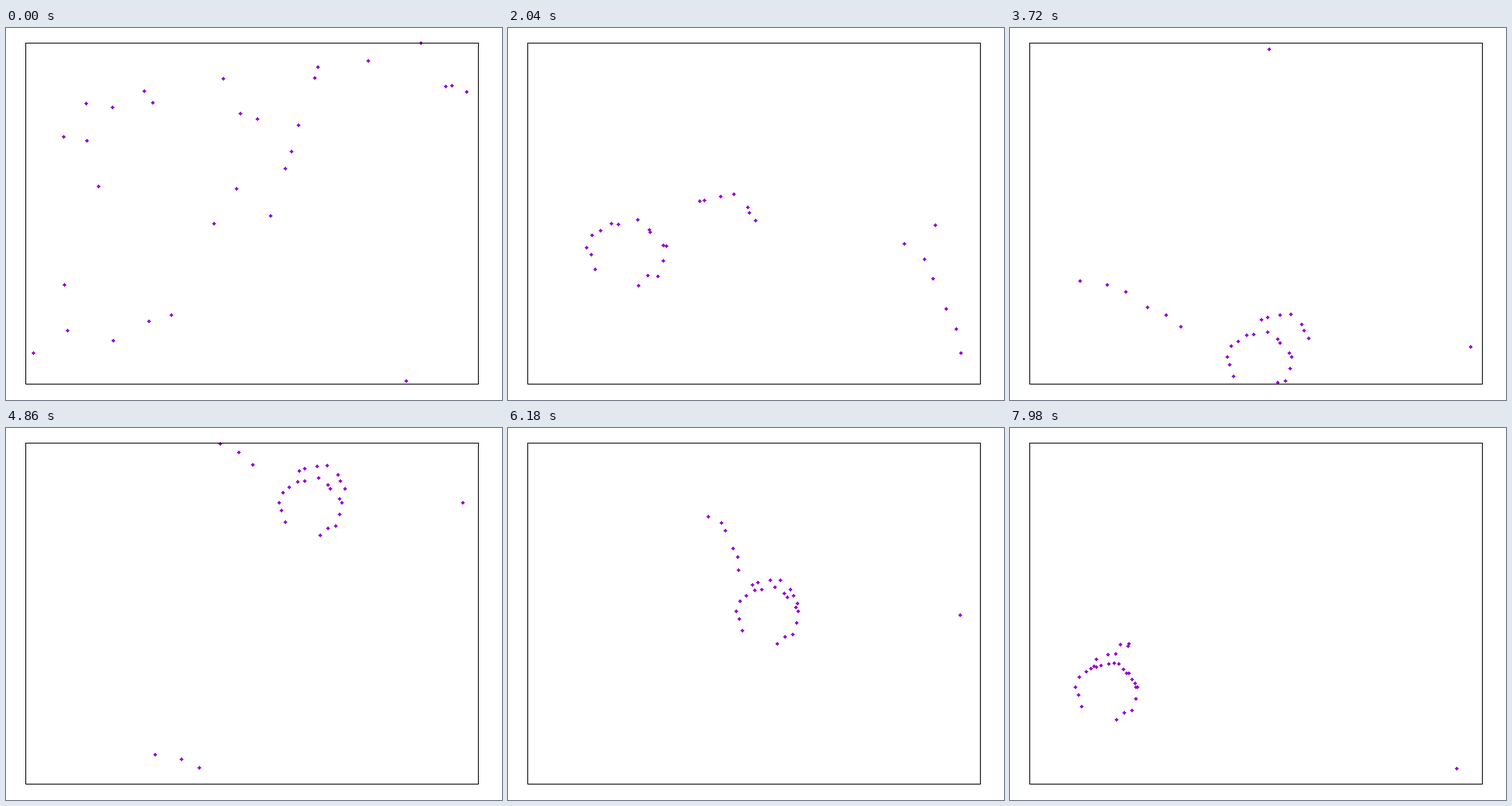
Write a matplotlib script that moves like this. It is 640 px wide and 480 px high and loops after 8000 ms.

```python
import numpy as np
import matplotlib.pyplot as plt
from matplotlib.animation import FuncAnimation
from matplotlib.collections import PolyCollection
from matplotlib.patches import Rectangle

W, H, DPI = 640, 480, 100
FRAMES, STEP = 400, 20
CORNER = np.array([25, 19])
SIZE = np.array([584, 440])      # the box is a torus
PURPLE = "#9400d3"

rng = np.random.default_rng(4)
steps = np.arange(FRAMES)
knots = np.array([0, 38, 102, 186, 243, 309, 399])
scatter = np.exp(-steps / 45)    # how disordered the birds still are


def route(*xy):
    """Smooth path through one point per knot, shape (FRAMES, 2).

    Points run on past the box edge and are wrapped when drawn."""
    pts = np.array(xy, float).reshape(-1, 2)
    slopes = np.gradient(pts, knots, axis=0, edge_order=2)
    i = np.clip(np.searchsorted(knots, steps, side="right") - 1, 0, len(knots) - 2)
    span = (knots[i + 1] - knots[i])[:, None]
    u = (steps - knots[i])[:, None] / span
    ease = u * u * (3 - 2 * u)
    return (pts[i] * (1 - ease) + pts[i + 1] * ease
            + span * u * (1 - u) * ((1 - u) * slopes[i] - u * slopes[i + 1]))


def wobble(count, calm, wild):
    """Seeded offsets that settle from wild to calm, shape (FRAMES, count, 2)."""
    size = calm + (wild - calm) * scatter
    return size[:, None, None] * rng.uniform(-1, 1, (count, 2))


def arch(centre, count, first, last):
    """Birds spread over part of an ellipse that shrinks as they gather."""
    a = np.radians(np.linspace(first, last, count))
    ring = np.stack([np.cos(a), np.sin(a)], axis=1)
    radii = np.stack([40 + 110 * scatter, 37 + 50 * scatter], axis=1)
    return centre[:, None] + radii[:, None] * ring + wobble(count, 4, 38)


def string(head, tail, count):
    """Birds in a row between two moving ends."""
    share = np.linspace(0, 1, count)[:, None]
    row = head[:, None] + (tail - head)[:, None] * share
    return row + wobble(count, 7, 25)


lead = route(215, 160, 210, 180, 150, 290, 320, 430, 391, 542, 333, 682, 123, 780)
head = route(549, 436, 463, 408, 516, 270, 678, 319, 780, 414, 846, 548, 740, 715)
tail = route(803, 378, 695, 384, 586, 422, 806, 387, 904, 489, 883, 625, 697, 740)
loner = route(659, 331, 565, 361, 551, 254, 594, 411, 589, 536, 583, 681, 576, 879)

# the second flock closes in on the first until it rides on its back
lag = np.stack([262 / (1 + np.exp((steps - 95) / 40)),
                -45 * (1 - steps / FRAMES)], axis=1)

birds = np.concatenate([arch(lead, 16, 150, 430),
                        arch(lead + lag, 7, 235, 355),
                        string(head, tail, 6),
                        loner[:, None]], axis=1)
spots = np.rint(CORNER + (birds - CORNER) % SIZE) + 0.5

fig = plt.figure(figsize=(W / DPI, H / DPI), dpi=DPI, facecolor="white")
ax = fig.add_axes([0, 0, 1, 1])
ax.set_xlim(0, W)
ax.set_ylim(H, 0)
ax.axis("off")
ax.add_patch(Rectangle(CORNER + 0.2, *SIZE, fill=False, edgecolor="black",
                       linewidth=72 / DPI, antialiased=False, snap=True, zorder=3))

diamond = 1.95 * np.array([(1, 0), (0, 1), (-1, 0), (0, -1)])
dots = PolyCollection([diamond], facecolors=PURPLE, edgecolors="none",
                      linewidths=0, antialiaseds=False, zorder=2)
dots.set_snap(False)
ax.add_collection(dots, autolim=False)


def draw(t):
    dots.set_verts(spots[t][:, None] + diamond)
    return [dots]


anim = FuncAnimation(fig, draw, frames=FRAMES, interval=STEP, repeat=True)
plt.show()
```
